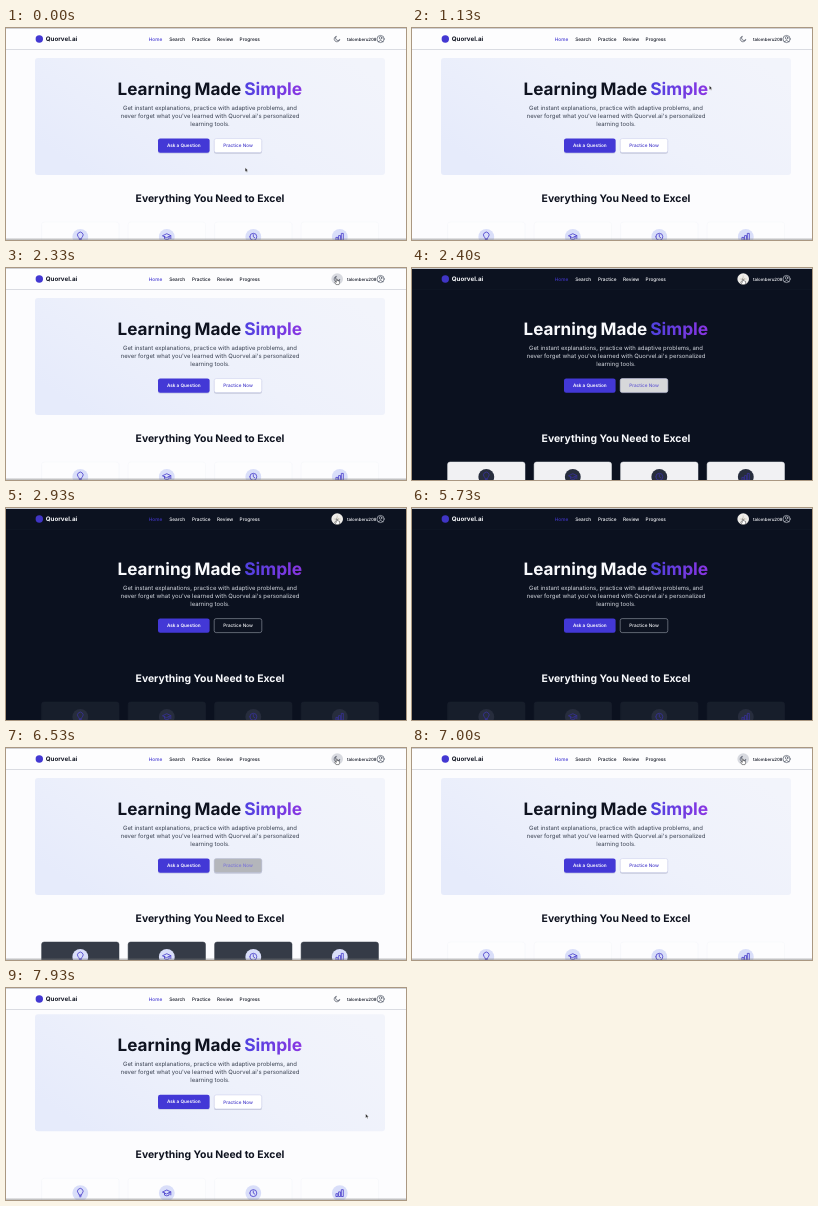
Animation, 400 px wide and 212 px high, one loop 8000 ms. Source, as an HTML page:

```html
<!DOCTYPE html>
<html lang="en">
<head>
<meta charset="utf-8">
<title>Study helper</title>
<style>
  html, body { margin: 0; width: 100%; height: 100%; overflow: hidden; }
  svg {
    display: block; width: 100vw; height: 100vh;
    font-family: Inter, "Open Sans", sans-serif;
    text-rendering: geometricPrecision;
    --page: #fcfcfe; --bar: #fdfdfe; --line: #d6d8df; --ink: #0f1320; --soft: #3a4252;
    --home: #4338d2; --disc: #d9def9; --icon: #4338ca; --hover: #d8dae0; --edge: #d0d0d3;
  }
  svg.dark {
    --page: #0b111f; --bar: #0c1220; --line: #0f1624; --ink: #f8f9fc; --soft: #d3d7df;
    --home: #4035c4; --disc: #272d3d; --icon: #38319a; --hover: #efede9; --edge: #c4c8cd;
  }
  .ink { fill: var(--ink); }
  .soft { fill: var(--soft); }
  .b { font-weight: 700; }
  .m { font-weight: 500; }
  .mid { text-anchor: middle; }
  .stroke { fill: none; stroke-linecap: round; stroke-linejoin: round; }
  .dark .day { display: none; }
  svg:not(.dark) .night { display: none; }
</style>
</head>
<body>
<svg id="stage" viewBox="0 0 400 212" preserveAspectRatio="none">
  <defs>
    <linearGradient id="heroFill" x1="0" y1="0.7" x2="1" y2="0.2">
      <stop offset="0" stop-color="#e6ebfb"/>
      <stop offset="0.5" stop-color="#eef1fb"/>
      <stop offset="1" stop-color="#f2f4fb"/>
    </linearGradient>
    <linearGradient id="wordFill">
      <stop offset="0" stop-color="#4f42e0"/>
      <stop offset="1" stop-color="#8a35e2"/>
    </linearGradient>
    <linearGradient id="footFill" x1="0" y1="0" x2="0" y2="1">
      <stop offset="0" stop-color="#777" stop-opacity="0"/>
      <stop offset="1" stop-color="#777" stop-opacity="0.55"/>
    </linearGradient>
  </defs>

  <rect width="400" height="212" fill="var(--page)"/>

  <g id="content">
    <rect class="day" x="29" y="30" width="350" height="117" rx="3" fill="url(#heroFill)"/>
    <g class="b" font-size="17.1">
      <text class="ink" x="111.6" y="66.9">Learning</text>
      <text class="ink" x="188.5" y="66.9">Made</text>
      <text x="238.2" y="66.9" font-size="17.4" fill="url(#wordFill)">Simple</text>
    </g>
    <g class="soft mid" font-size="5.93">
      <text x="204" y="81.7">Get instant explanations, practice with adaptive problems, and</text>
      <text x="204" y="89.6">never forget what you've learned with Quorvel.ai's personalized</text>
      <text x="204" y="97.5">learning tools.</text>
    </g>

    <rect class="day" x="152" y="111.4" width="51.6" height="14.4" rx="2.2" fill="#9aa0c8" opacity="0.35"/>
    <rect x="152" y="110.4" width="51.6" height="14.4" rx="2.2" fill="#4338d6"/>
    <text class="mid" x="177.8" y="119.2" font-size="4.65" font-weight="600" fill="#fff">Ask a Question</text>

    <rect class="day" x="208" y="111.4" width="48" height="14.4" rx="2.2" fill="#8b90a8" opacity="0.4"/>
    <rect id="btn" x="208.2" y="110.6" width="47.6" height="14" rx="2" stroke-width="0.6"/>
    <text id="btnText" class="mid m" x="232" y="119.3" font-size="4.65">Practice Now</text>

    <text class="ink b mid" x="204" y="174" font-size="10.4">Everything You Need to Excel</text>
    <g id="cards"></g>
  </g>

  <rect width="400" height="21.3" fill="var(--bar)"/>
  <rect y="21" width="400" height="0.9" fill="var(--line)"/>
  <rect width="400" height="1" fill="var(--edge)"/>

  <circle cx="33.3" cy="11" r="3.7" fill="var(--home)"/>
  <text class="ink b" x="39.8" y="13.1" font-size="6.2">Quorvel.ai</text>
  <g id="nav" class="ink m" font-size="4.75"></g>

  <circle id="hover" cx="331.2" cy="11" r="5.8" fill="var(--hover)"/>
  <path class="day stroke" stroke="#303747" stroke-width="0.6"
    d="M333.7 11.9A2.8 2.8 0 1 1 330.4 8.3A2.3 2.3 0 0 0 333.7 11.9Z"/>
  <g class="night stroke" stroke="#b9b2a0" stroke-width="0.5">
    <circle cx="331.2" cy="11" r="1.3"/>
    <path d="M331.2 7.9v.8M331.2 13.3v.8M328.1 11h.8M333.5 11h.8"/>
  </g>
  <text class="ink m" x="341" y="12.6" font-size="4.4">talomberu208</text>
  <g class="stroke" stroke="var(--soft)" stroke-width="0.6">
    <circle cx="374.6" cy="11" r="3.6"/>
    <circle cx="374.6" cy="9.9" r="1.3"/>
    <path d="M372.2 13.6Q374.6 10.9 377 13.6"/>
  </g>

  <rect class="day" x="0" y="209.5" width="400" height="2.5" fill="url(#footFill)"/>

  <g id="cursor">
    <path id="arrow" d="M0 0V3.9L.95 3.05L1.6 4.5L2.3 4.2L1.65 2.8H2.85Z"
      fill="#111" stroke="#fff" stroke-width="0.35"/>
    <path id="hand" d="M-.5.5Q0-.4.5.5V2.1Q1.1 1.8 1.4 2.3Q2 2.1 2.2 2.7Q2.8 2.6 2.8 3.3V4.4L2.2 6H-.7L-2 3.9Q-2.2 3-1.3 3.2L-.5 3.9Z"
      fill="#fff" stroke="#222" stroke-width="0.45" stroke-linejoin="round"/>
  </g>
</svg>

<script>
const LOOP = 8000, DARK_AT = 2380, LIGHT_AT = 6470;
const $ = id => document.getElementById(id);
const NS = "http://www.w3.org/2000/svg";

function add(parent, tag, attrs, text) {
  const el = document.createElementNS(NS, tag);
  for (const key in attrs) el.setAttribute(key, attrs[key]);
  if (text) el.textContent = text;
  parent.appendChild(el);
  return el;
}

const links = [["Home", 142.8], ["Search", 163.2], ["Practice", 186], ["Review", 211], ["Progress", 233.6]];
links.forEach(([label, x], i) =>
  add($("nav"), "text", { x, y: 12.7, style: i ? "" : "fill: var(--home)" }, label));

// Icons are drawn around 0,0: bulb, cap, clock, bars
const icons = [
  "M-1.2 1.5Q-1.3.8-2.1 0A2.8 2.8 0 1 1 2.1 0Q1.3.8 1.2 1.5ZM-1 2.7H1M-.5 3.7H.5",
  "M-4-1.2L0-3.1L4-1.2L0 .7ZM-2.3-.3V2Q0 3.6 2.3 2V-.3M4-1.2V1.8",
  "M-3.5 0A3.5 3.5 0 1 1 3.5 0A3.5 3.5 0 1 1-3.5 0M0-2.2V0L1.5 1",
  "M-3.5.6H-1.9V3.4H-3.5ZM-.8-1.2H.8V3.4H-.8ZM1.9-3.4H3.5V3.4H1.9Z"
];
const cards = icons.map((d, i) => {
  const x = 35.6 + i * 86.5;
  const card = add($("cards"), "rect", { x, y: 194, width: 77.4, height: 40, rx: 2.5, "stroke-width": 0.5 });
  const g = add($("cards"), "g", { transform: `translate(${x + 38.7} 208.8)` });
  add(g, "circle", { r: 7.9, fill: "var(--disc)" });
  add(g, "path", { d, class: "stroke", stroke: "var(--icon)", "stroke-width": 0.8 });
  return card;
});

const clamp = v => Math.min(1, Math.max(0, v));
const lerp = (a, b, k) => a + (b - a) * k;
const span = (t, from, to) => clamp((t - from) / (to - from));
const smooth = k => k * k * (3 - 2 * k);
const mix = (a, b, k) => `rgb(${a.map((v, i) => Math.round(lerp(v, b[i], k)))})`;

// cubic-bezier(.25, .1, .25, 1)
function ease(x) {
  const bez = (s, p, q) => 3 * (1 - s) * (1 - s) * s * p + 3 * (1 - s) * s * s * q + s * s * s;
  let lo = 0, hi = 1;
  for (let i = 0; i < 20; i++) {
    const s = (lo + hi) / 2;
    if (bez(s, 0.25, 0.25) < x) lo = s; else hi = s;
  }
  return bez((lo + hi) / 2, 0.1, 1);
}

// How far a fading part has gone towards its dark colours
function darkness(t, fadeIn, fadeOut) {
  if (t < DARK_AT) return 0;
  if (t < LIGHT_AT) return ease(span(t, DARK_AT, DARK_AT + fadeIn));
  return 1 - ease(span(t, LIGHT_AT, LIGHT_AT + fadeOut));
}

function draw(t) {
  $("stage").classList.toggle("dark", t >= DARK_AT && t < LIGHT_AT);

  const cardDark = darkness(t, 300, 500);
  for (const card of cards) {
    card.setAttribute("fill", mix([253, 253, 254], [23, 30, 43], cardDark));
    card.setAttribute("stroke", mix([243, 244, 248], [26, 33, 46], cardDark));
  }
  const btnDark = darkness(t, 150, 150);
  $("btn").setAttribute("fill", mix([255, 255, 255], [13, 19, 33], btnDark));
  $("btn").setAttribute("stroke", mix([205, 209, 236], [150, 156, 168], btnDark));
  $("btnText").setAttribute("fill", mix([67, 56, 202], [248, 249, 252], btnDark));

  const go = smooth(span(t, 670, 1450));
  const leave = smooth(span(t, 7270, 7930));
  const x = lerp(lerp(239.2, 330.8, go), 359.7, leave);
  const y = lerp(lerp(139.8, 10.6, go), 126, leave);
  const over = Math.hypot(x - 331.2, y - 11) < 5.8;
  $("cursor").setAttribute("transform", `translate(${x} ${y})`);
  $("hover").style.display = over ? "" : "none";
  $("hand").style.display = over ? "" : "none";
  $("arrow").style.display = over ? "none" : "";

  const scroll = 3.7 * smooth(span(t, 7560, 7900));
  $("content").setAttribute("transform", `translate(0 ${-scroll})`);
}

function tick() {
  draw(performance.now() % LOOP);
  requestAnimationFrame(tick);
}
tick();
</script>
</body>
</html>
```
